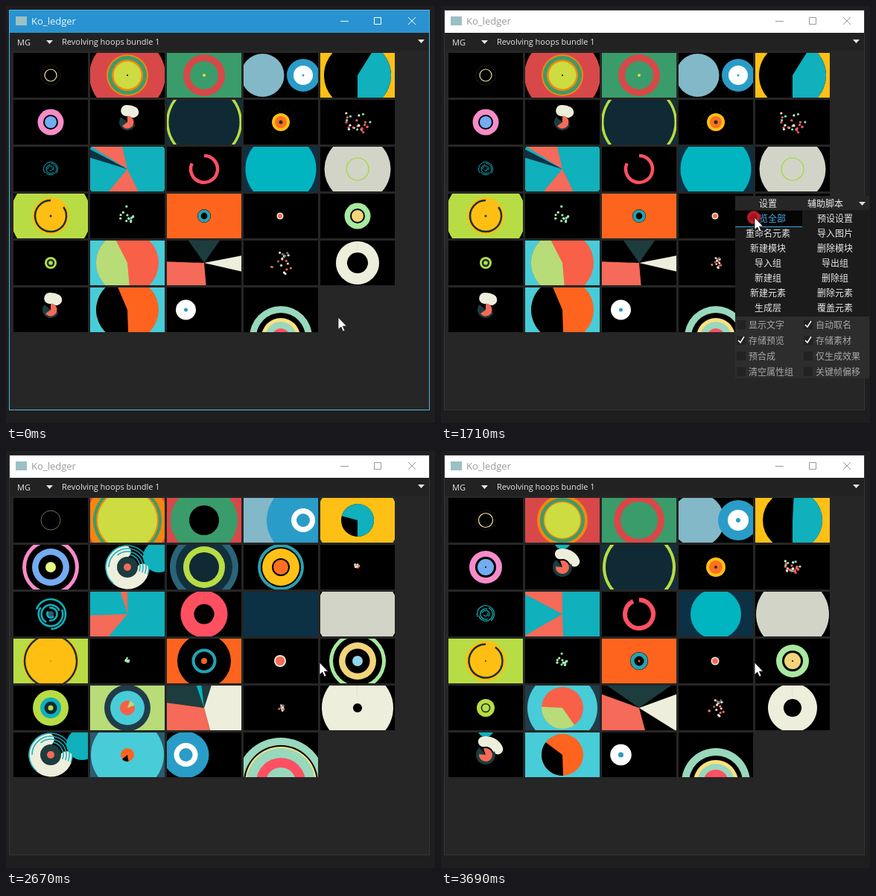
These frames come from a looping animation (576x560 px, 4.2 s). An HTML page:

```html
<!DOCTYPE html>
<html lang="en">
<head>
<meta charset="utf-8">
<title>Ko_ledger</title>
<style>
html,body{margin:0;width:100%;height:100%;overflow:hidden;background:#1e1e1e}
svg{display:block}
text{font-family:"Open Sans","Noto Sans",sans-serif}
#menu text{font:12px "Noto Sans CJK SC","Noto Sans CJK",sans-serif}
</style>
</head>
<body>
<svg id="stage" width="576" height="560" viewBox="0 0 576 560">
  <defs>
    <linearGradient id="stripe" gradientUnits="userSpaceOnUse" spreadMethod="repeat" x1="0" y1="0" x2="1.6" y2="1.6">
      <stop offset=".6" stop-color="#ffc015"/><stop offset=".6" stop-color="#3a2c08"/>
    </linearGradient>
  </defs>
  <rect width="576" height="560" fill="#1e1e1e"/>
  <rect id="frame" x="4.5" y="5.5" width="564" height="537" fill="#262626"/>
  <rect id="bar" x="5" y="6" width="563" height="30"/>
  <rect x="5" y="36" width="563" height="24" fill="#222"/>
  <rect x="13" y="14" width="15" height="12" fill="#9cc0c4"/>
  <text id="title" x="34" y="25" font-size="13">Ko_ledger</text>
  <path id="buttons" d="M449 20.5h11M494.5 15.5h9v9h-9zM540 15l10 10M550 15l-10 10" fill="none"/>
  <g fill="#e4e4e4" font-size="11">
    <text x="15" y="52.500">MG</text>
    <text x="75" y="52">Revolving hoops bundle 1</text>
    <path d="M54 46h9l-4.500 5zM553 45h9l-4.500 5z"/>
  </g>
  <g id="cells"></g>
  <g id="menu"></g>
  <g id="click"><circle cx="420" cy="284" r="9" fill="#e0222e" opacity=".8"/><circle cx="420" cy="284" r="5" fill="#a80f1c"/></g>
  <path id="cursor" d="M0 0V16.500L3.800 13L6.400 19L9 17.900L6.400 12H11.500Z" fill="#fff" stroke="#111" stroke-width=".8"/>
</svg>
<script>
const $ = id => document.getElementById(id);
const LOOP = 4200, STEP = 30, MOVE_END = 3690;
const MENU_ON = 1110, MENU_OFF = 1770, PLAY = 1875, CLIP = 1170, POSTER = 585;
const TEAL = '#10b0bc', CORAL = '#f56a58', CREAM = '#eeeedc', LIME = '#b8dc44', YELLOW = '#ffc015',
  ORANGE = '#ff641e', RED = '#ff5062', CYAN = '#48ccd8', BLUE = '#2a9cc8', DEEP = '#0c3044',
  DARK = '#1d3c3e', GREEN = '#3a9c6a', SCARLET = '#d84848', MINT = '#98d8bc', BLACK = '#000';

// Clip times, in ms, at which the value lists below apply
const KEYS = [200, 525, 585, 645, 795, 1065];
let phase = 0;

function at(v) {
  if (!Array.isArray(v)) return v;
  if (phase <= KEYS[0]) return v[0];
  for (let i = 1; i < KEYS.length; i++)
    if (phase <= KEYS[i]) return v[i - 1] + (v[i] - v[i - 1]) * (phase - KEYS[i - 1]) / (KEYS[i] - KEYS[i - 1]);
  return v[v.length - 1];
}
const polar = (x, y, r, a) => `${(x + r * Math.cos(a * Math.PI / 180)).toFixed(2)} ${(y + r * Math.sin(a * Math.PI / 180)).toFixed(2)}`;
const fill = col => `<rect width="100" height="60" fill="${col}"/>`;

function disc(col, r, x = 50, y = 30, ry = r) {
  const a = at(r), b = at(ry);
  return a > 0.05 ? `<ellipse cx="${x}" cy="${y}" rx="${a.toFixed(2)}" ry="${b.toFixed(2)}" fill="${col}"/>` : '';
}
function sweep(r, a, b, x, y) {
  return `${polar(x, y, r, a)}A${r} ${r} 0 ${b - a > 180 ? 1 : 0} 1 ${polar(x, y, r, b)}`;
}
function pie(col, r, a, b) {
  r = at(r); a = at(a); b = at(b);
  if (b - a < 0.2 || r < 0.1) return '';
  return b - a > 359.5 ? disc(col, r) : `<path d="M50 30L${sweep(r, a, b, 50, 30)}Z" fill="${col}"/>`;
}
function arc(col, r, w, a, b, cap = 'butt') {
  r = at(r); w = at(w); a = at(a); b = at(b);
  if (b - a < 0.2 || r < 0.1 || w < 0.1) return '';
  return `<path d="M${sweep(r, a, Math.min(b, a + 359.9), 50, 30)}" fill="none" stroke="${col}" stroke-width="${w}" stroke-linecap="${cap}"/>`;
}
function circle(col, r, w, x = 50, y = 30, o = 1, dash = '') {
  const a = at(r);
  return a > 0.1 ? `<circle cx="${x}" cy="${y}" r="${a}" fill="none" stroke="${col}" stroke-width="${at(w)}" opacity="${at(o)}" stroke-dasharray="${dash}"/>` : '';
}
const rand = s => { const v = Math.sin(s * 12.9898) * 43758.5453; return v - Math.floor(v); };

function dots(n, seed, spread, cols, x, y) {
  const s = at(spread), size = at([1.6, 1.5, 1.6, 1.6, 1.3, 0]);
  let out = '';
  for (let i = 0; i < n; i++) {
    const d = s * Math.sqrt(rand(seed + i)), a = 360 * rand(seed + i + 50);
    const [px, py] = polar(x, y, d, a).split(' ');
    out += disc(cols[i % cols.length], size, px, py);
  }
  return out;
}

const swirl = () => {
  let out = disc(CREAM, [0, 0, 0, 0, 0, 56]);
  out += disc(TEAL, [0, 0, 0, 11, 21, 0], at([50, 50, 50, 50, 92, 120]), at([-16, -14, -12, -5, 16, 30]));
  out += arc(CREAM, [13, 15, 15.5, 18, 21, 30], [0, 14, 15, 14, 17, 24], [-95, -91, -95, -100, 10, 0], [-95, -84, -60, -25, 260, 360], 'round');
  for (let i = 0; i < 4; i++)
    out += arc(TEAL, [0, 0, 0, 0, 17 + 4 * i, 27 + 6 * i], [0, 0, 0, 0, 1.5, 2], -80 - 50 * i, [0, 0, 0, 0, 20, 190 - 50 * i]);
  return out + pie(DARK, [0, 9, 11, 13, 14, 20], [60, 60, 20, -20, -90, -90], [60, 200, 220, 230, 270, 270])
    + pie(CORAL, [0, 8, 8.5, 9, 5, 13], [-70, -75, -90, -110, -140, -140], [-70, 110, 145, 185, 220, 220]);
};
const spiral = () => {
  const r = at([0, 8, 9.5, 11.5, 20, 34]), w = at([0, .8, 1, 1.2, 2.6, 6.5]), turn = phase / 4;
  let out = disc('#2d5a70', [0, 0, 0, 0, 4, 13]);
  for (let i = 0; i < 5; i++) out += arc(TEAL, r * (1 - .19 * i), w, turn * (1 + i * .2) + i * 100, turn * (1 + i * .2) + i * 100 + 250 - i * 15);
  return out;
};
const target = (a, b, c, d) => disc(a, [0, 14, 17.5, 22, 38, 56]) + disc(BLACK, [0, 7, 10, 14, 33, 52])
  + disc(b, [0, 5.5, 8, 11, 25, 49]) + disc(BLACK, [0, 0, 0, 1, 16.5, 43]) + disc(c, [0, 0, 0, 0, 7, 34]) + disc(d, [0, 0, 0, 0, 0, 23]);
const eye = (x, blue, r, hole) => disc(BLUE, blue, x) + disc('#fff', r, x) + disc(BLUE, hole, x);

const clips = [
  () => circle('#6b5a3c', 13, 1, 50, 30, [0, .9, .7, .5, 0, 0], '1 1') + circle('#f0e4a8', [0, 4.2, 8, 9.5, 13, 11], [1, 1, 1.2, 1.2, .8, .6], 50, 30, [1, .8, 1, 1, .6, .25], phase > 900 ? '1 8' : ''),
  () => disc(SCARLET, [0, 42, 51, 60, 90, 140]) + disc('#f5860e', [0, 22, 28, 34, 55, 140]) + disc(GREEN, [0, 20, 26, 30, 46, 140])
    + disc('#f5860e', [0, 16, 21, 25.5, 42, 140]) + disc('#cddc40', [0, 14.5, 18.5, 24, 40, 140]) + disc(BLACK, [0, 2, 1, 0, 0, 0]),
  () => disc(GREEN, [0, 62, 64, 66, 70, 70]) + disc(SCARLET, [0, 22, 28, 34, 65, 90]) + disc(GREEN, [0, 15, 19, 25, 45, 90])
    + disc('#dce040', [0, 4, 2, 0, 0, 0]) + disc(BLACK, [0, 0, 0, 0, 20, 75]),
  () => disc('#82b8c8', [0, 24, 29, 36, 85, 85], 25.5) + eye(80, [0, 18, 22, 27, 49, 82], [0, 11, 13, 14, 16, 17], [0, 1, 1.5, 3, 9, 14.5]),
  () => fill(phase < 700 ? YELLOW : DEEP) + disc(YELLOW, [70, 70, 70, 70, 56, 14.5]) + disc(BLACK, [70, 50, 45, 40, 22, 2.5])
    + pie(TEAL, [70, 50, 45, 40, 22, 2.5], [90, -35, -58, -87, -165, -270], 90),

  () => target('#f78cc8', '#74acf2', '#e4fa84', '#e4fa84'),
  swirl,
  () => disc('#2a6478', [0, 80, 70, 64, 46, 12]) + disc('#12303c', [0, 78, 68, 62, 38, 9]) + disc(LIME, [0, 60, 51, 49, 28, 0])
    + disc('#0f2a34', [0, 55, 47.5, 45, 20, 0]) + disc('#3a90a0', [0, 0, 0, 0, 0, 8]),
  () => circle('#7a6420', [0, 17, 18, 19, 0, 0], 1, 50, 30, .5, '1 5') + disc('#2aa0b0', [0, 0, 0, 0, 31, 80]) + disc(BLACK, [0, 0, 0, 0, 27, 75])
    + disc(YELLOW, [0, 11, 12, 13, 25, 72]) + disc(BLACK, [0, 0, 0, 0, 12, 28]) + circle('#5c4014', [0, 0, 0, 0, 0, 12], 1, 50, 30, .8, '1 2')
    + disc('#ff7020', [0, 7, 8, 9, 10, 5]) + disc('#203038', [0, 3, 2.5, 2, 0, 0]),
  () => dots(26, 3, [62, 21, 18, 11, 3, 0], [CORAL, CREAM, '#8cd8b0', RED], 49, 28) + disc('#ffdc80', [0, 0, 0, 0, 0, 32.5]) + disc(RED, [0, 0, 0, 0, 0, 22]),

  spiral,
  () => disc(TEAL, [0, 54, 57, 70, 90, 90]) + pie(CORAL, [0, 54, 57, 70, 90, 90], [-120, -142, -148, -152, -107, -90], [-120, -88, -103, -90, -90, -90])
    + pie(CORAL, [0, 54, 57, 70, 90, 90], [95, 50, 64, 88, 130, 178], [95, 138, 130, 150, 178, 178]) + pie(DEEP, 57, [-150, -163, -163, -152, -152, -152], [-150, -146, -152, -152, -152, -152]),
  () => arc(RED, [16, 17, 18, 19, 22.5, 27.5], [1, 4, 4.5, 6, 18, 43], -90, [-90, 165, 205, 245, 270, 270]),
  () => fill(DEEP) + disc('#00b5c0', [0, 62, 47.5, 34, 0, 0]) + disc(YELLOW, [0, 0, 0, 0, 0, 45]) + disc(DEEP, [0, 0, 0, 0, 0, 32]) + circle('#1c5468', [0, 0, 0, 0, 0, 3], .8),
  () => disc('#d2d4c8', [0, 42, 44.5, 49, 56, 75]) + circle('#a0d82c', [8, 18, 15, 0, 0, 0], 1.2)
    + (phase < 560 && phase > 300 ? '<rect x="49.500" width="1.500" height="6" fill="#6b7a30"/>' : ''),

  () => disc(LIME, [0, 51, 54, 62, 80, 80]) + disc('#ffbf12', [0, 23, 25, 27, 38, 72]) + arc('#16303c', [17, 20, 21, 22.5, 35, 51], 2.5, [270, -25, -35, -55, -85, -90], 270) + disc('#16303c', [0, 2, 1.5, 1, .6, 0]),
  () => dots(13, 21, [58, 16, 12, 9, 3, 0], ['#98f5a0', '#b8f8c0', '#90e8b8'], 50, 29) + disc('#9af8a2', [0, 0, 0, 0, 0, 51]),
  () => disc(ORANGE, [0, 62, 62, 62, 62, 62]) + disc(BLACK, [0, 9, 9, 12, 36, 75]) + circle('#22a4b4', [0, 3, 6.5, 9, 14.5, 0], [0, 1.6, 4.2, 5, 4, 0])
    + disc(ORANGE, [0, 0, 0, 1.5, 4, 0]) + disc('url(#stripe)', [0, 0, 0, 0, 0, 9]),
  () => disc(CREAM, [0, 3.6, 4.5, 5.5, 8, 23], 49) + disc(CORAL, [0, 2, 3, 4, 6.2, 11.5], 49) + disc(CREAM, [0, 0, 0, 0, 0, 10], 49)
    + disc(CORAL, [0, 0, 0, 0, 0, 7.5], 49) + disc(CREAM, [0, 0, 0, 0, 0, 3], 49) + disc(CORAL, [0, 0, 0, 0, 0, 1.3], 49),
  () => target('#a8e8a0', '#f2d47a', '#94d4ea', '#dca4ea'),

  () => disc(LIME, [0, 7, 8, 12, 24, 43]) + disc(TEAL, [0, 0, 0, 0, 14, 39]) + disc('#0e2a34', [0, 4, 5.2, 6.3, 8.5, 18]) + disc(LIME, [0, 2, 2.8, 4.8, 3.5, 8]),
  () => fill(phase < 200 ? BLACK : '#b8dc78') + disc('#203c48', [90, 90, 80, 60, 31, 0]) + disc(CYAN, [0, 70, 66, 47, 23, 0]) + disc('#f86048', [0, 42, 42, 28, 10, 0])
    + pie('#b8dc78', [0, 42, 42, 28, 10, 0], [90, 90, 85, 55, -70, -70], [300, 272, 243, 183, -20, -20]) + `<rect y="${30 - at([0, 0, 0, 0, 0, 1])}" width="100" height="${at([0, 0, 0, 0, 0, 2])}" fill="#607840"/>`,
  () => pie(DARK, 70, [-90, -107, -125, -145, -172, -180], [-90, -73, -55, -35, -72, -38]) + pie('#00b8c4', 70, [-100, -100, -100, -100, -109, -180], [-100, -100, -100, -100, -97, -38])
    + pie(CORAL, 70, [128, 97, 85, 75, 75, 88], [128, 162, 182, 200, 188, 180]) + pie(CREAM, 70, [0, -8, -11, -20, -72, -38], [0, 8, 13, 32, 75, 88]),
  () => dots(20, 77, [62, 20, 16, 12, 4, 0], [CREAM, CORAL, '#f4ddd0', '#7a7068'], 51, 30) + disc(CORAL, [0, 0, 0, 0, 0, 46]) + disc(DARK, [0, 0, 0, 0, 0, 38]) + disc(CREAM, [0, 0, 0, 0, 0, 30]),
  () => arc(CREAM, [16, 20, 21.5, 22.5, 27, 37], [0, 8, 15, 21, 42, 70], -90, [-90, 270, 270, 270, 270, 270]),

  swirl,
  () => fill(phase < 200 ? BLACK : '#2c5a70') + disc(CYAN, [0, 70, 70, 70, 49, 2.5], 50, 30, [0, 70, 70, 70, 49, 400]) + disc(ORANGE, [0, 42, 42, 28, 9, 0])
    + pie(BLACK, [0, 42, 42, 28, 9, 0], [90, 90, 88, 88, 80, 80], [300, 272, 247, 217, 140, 140]),
  () => eye(25.5, [0, 0, 0, 0, 31, 82], [0, 13, 13.5, 14.3, 16, 16.5], [0, 1, 2.5, 3.5, 9, 14.5]),
  () => [[MINT, [0, 38, 42, 46, 60, 95]], [BLACK, [0, 27, 33, 36, 50, 80]], ['#ffe080', [0, 21, 26, 30, 48, 75]], [MINT, [0, 12, 21, 25, 46, 72]],
    [RED, [0, 0, 12, 17, 33, 56]], [MINT, [0, 0, 0, 0, 20, 47]], [RED, [0, 0, 0, 0, 0, 39]]].map(([c, r]) => disc(c, r, 50, 67)).join('')
];

$('cells').innerHTML = clips.map((_, i) => `<svg x="${10 + 103 * (i % 5)}" y="${63 + 63 * Math.floor(i / 5)}" width="100" height="60"></svg>`).join('');
const views = [...$('cells').children];

const label = (x, y, s, col, anchor = 'middle') => `<text x="${x}" y="${y}" fill="${col}" text-anchor="${anchor}">${s}</text>`;
function buildMenu() {
  const items = ['预览全部 重命名元素 新建模块 导入组 新建组 新建元素 生成层', '预设设置 导入图片 删除模块 导出组 删除组 删除元素 覆盖元素'];
  const checks = ['显示文字 +存储预览 预合成 清空属性组', '+自动取名 +存储素材 仅生成效果 关键帧偏移'];
  let out = '<rect x="395" y="255" width="180" height="245" fill="#1b1b1b"/><rect x="395" y="255" width="180" height="19" fill="#262626"/>'
    + '<rect x="395" y="417" width="180" height="83" fill="#2d2d2d"/><g id="hot"><rect x="395" y="275" width="90" height="21" fill="#050505"/><path d="M395 296.500h90" stroke="#3fa2de"/></g>'
    + label(439, 270, '设置', '#eee') + label(516, 270, '辅助脚本', '#eee') + '<path d="M561 263h9l-4.500 5z" fill="#ddd"/>';
  items.forEach((col, c) => col.split(' ').forEach((s, r) => out += label(439 + 90 * c, 290 + 20 * r, s, '#e8e8e8')));
  checks.forEach((col, c) => col.split(' ').forEach((s, r) => {
    const x = 397 + 90 * c, y = 422 + 21 * r;
    out += `<rect x="${x}" y="${y}" width="12" height="12" fill="#222"/>` + label(x + 16, y + 11, s.replace('+', ''), '#a8a8a8', 'start');
    if (s[0] === '+') out += `<path d="M${x + 2} ${y + 6}l3 3l5-8" fill="none" stroke="#fff" stroke-width="1.500"/>`;
  }));
  $('menu').innerHTML = out;
}
buildMenu();
const hotText = $('menu').querySelectorAll('text')[2];

const path = [[570, 446, 418], [660, 440, 345], [720, 372, 320], [810, 303, 226], [930, 396, 256], [1140, 396, 256], [1500, 421, 284]];
function pointer(t) {
  if (t <= path[0][0]) return path[0].slice(1);
  for (let i = 1; i < path.length; i++) {
    const [t0, x0, y0] = path[i - 1], [t1, x1, y1] = path[i];
    if (t <= t1) { const u = (t - t0) / (t1 - t0); return [x0 + (x1 - x0) * u, y0 + (y1 - y0) * u]; }
  }
  return path[path.length - 1].slice(1);
}
function clipTime(i, t) {
  if (t >= PLAY) return (t - PLAY) % CLIP;
  if (t < MENU_OFF && i === 24 && t >= 645) return Math.min(t - 643, 1065);
  if (t < MENU_OFF && i === 23 && t >= 700) return Math.min(t - 700, 730);
  return POSTER;
}
const show = (id, on) => $(id).setAttribute('display', on ? 'inline' : 'none');
const set = (id, attrs) => { for (const k in attrs) $(id).setAttribute(k, attrs[k]); };

function draw(t) {
  const active = t < MENU_ON, [x, y] = pointer(t), hot = y >= 275;
  set('frame', { stroke: active ? '#4fb4e4' : '#3c4a50', 'stroke-dasharray': active ? 'none' : '1 1' });
  set('bar', { fill: active ? '#2992d0' : '#fff' });
  set('title', { fill: active ? '#eef7fc' : '#999' });
  set('buttons', { stroke: active ? '#fff' : '#999' });
  show('menu', t >= MENU_ON && t < MENU_OFF);
  show('hot', hot);
  hotText.setAttribute('fill', hot ? '#4aaae4' : '#e8e8e8');
  show('click', t >= 1650 && t < MENU_OFF);
  set('cursor', { transform: `translate(${x.toFixed(1)} ${y.toFixed(1)})` });
  views.forEach((v, i) => {
    phase = clipTime(i, t);
    v.innerHTML = fill(BLACK) + clips[i]();
  });
}

let last = -1;
function tick() {
  const t = Math.min(Math.floor(performance.now() % LOOP / STEP) * STEP, MOVE_END);
  if (t !== last) draw(last = t);
  requestAnimationFrame(tick);
}
tick();
</script>
</body>
</html>
```
